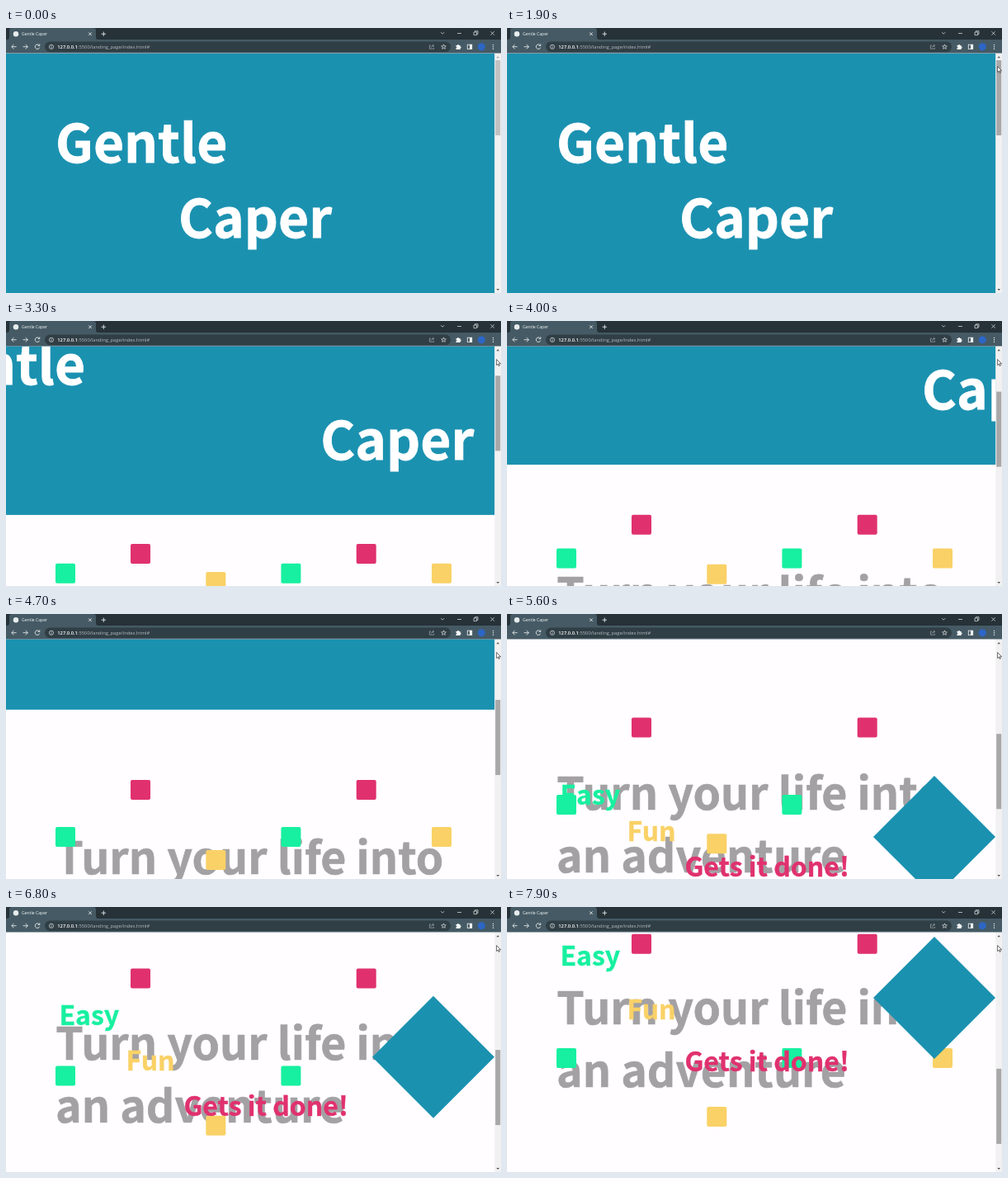
These frames come from a looping animation (600 px wide and 321 px high, 8 s). An HTML page:

```html
<!DOCTYPE html>
<html lang="en">
<head>
<meta charset="utf-8">
<title>Gentle Caper</title>
<style>
  html, body { margin: 0; width: 100%; height: 100%; overflow: hidden; background: #fffdff; }
  svg { display: block; width: 600px; height: 321px; }
  .big { font-family: "Noto Sans CJK JP", "Noto Sans CJK SC", "Noto Sans CJK", "Noto Sans", sans-serif; font-weight: 700; }
  .big text { fill: currentColor; stroke: currentColor; stroke-width: .0125em; }
  .ui { font-family: "Open Sans", "Noto Sans", sans-serif; }
  .line { fill: none; stroke: #e4e8ea; stroke-width: .9; }
  .thin { stroke-width: .7; }
</style>
</head>
<body>
<svg viewBox="0 0 600 321" xmlns="http://www.w3.org/2000/svg">
  <defs>
    <clipPath id="view"><rect y="30.5" width="592.4" height="290.5"/></clipPath>
  </defs>

  <rect width="600" height="321" fill="#fffdff"/>
  <g clip-path="url(#view)">
    <g id="lead" class="big" font-size="53.6" color="#a3a1a3">
      <text x="60.3">Turn your life into</text>
      <text x="60" y="76">an adventure</text>
    </g>
    <g id="squares"></g>
    <g class="big" font-size="32">
      <text id="easy" x="64.4" color="#17f0a0">Easy</text>
      <text id="fun" x="145.6" color="#f9d166">Fun</text>
      <text id="done" x="215.4" color="#e0316e">Gets it done!</text>
    </g>
    <path id="badge" d="M518 -74 L592 0 L518 74 L444 0 Z" fill="#1b91b0"/>
    <rect id="hero" y="30.5" width="593" height="290.5" fill="#1b91b0"/>
    <g class="big" font-size="64" color="#fff">
      <text id="word1" y="163">Gentle</text>
      <text id="word2" y="254">Caper</text>
    </g>
  </g>

  <!-- scrollbar -->
  <rect x="592.4" y="30.5" width="7.6" height="290.5" fill="#f1f1f1"/>
  <rect id="thumb" x="593.2" width="6" height="91"/>
  <path id="up" d="M594.4 36.3 L596.2 34.2 L598 36.3 Z"/>
  <path d="M594.4 316 L596.2 318.1 L598 316 Z" fill="#505050"/>

  <!-- browser window -->
  <rect width="600" height="15" fill="#263238"/>
  <rect y="14" width="600" height="16.5" fill="#455a64"/>
  <path d="M1 14 Q4 14 4 11 V3 Q4 0 7 0 H106 Q109 0 109 3 V11 Q109 14 112 14 Z" fill="#455a64"/>
  <circle cx="12" cy="7.2" r="3.2" fill="#e8ecee"/>
  <text class="ui" x="19" y="9.3" font-size="5.1" fill="#f2f5f6">Gentle Caper</text>
  <path class="line" d="M100.2 5.4 l3.6 3.6 m0 -3.6 l-3.6 3.6 M115.6 7.2 h5.4 m-2.7 -2.7 v5.4"/>
  <path class="line thin" d="M527.2 5.2 l2 2 l2 -2 M547 6.5 h5 M567 5 h3.6 v3.6 h-3.6 Z M568.4 5 v-1.3 h3.6 v3.6 h-1.3 M587.4 4.2 l4.4 4.4 m0 -4.4 l-4.4 4.4"/>
  <path class="line" d="M12.6 22.7 h-5.8 m2.7 -2.7 l-2.7 2.7 l2.7 2.7 M20.6 22.7 h5.8 m-2.7 -2.7 l2.7 2.7 l-2.7 2.7"/>
  <path class="line" d="M40.3 21 A2.8 2.8 0 1 0 40.7 23.6 M40.8 19.4 v2.1 h-2.1"/>
  <rect x="47" y="16.5" width="492" height="12.6" rx="6.3" fill="#303e45"/>
  <circle class="line thin" cx="55" cy="22.8" r="2.6"/>
  <path class="line thin" d="M55 22.3 v2 M55 21 v.6"/>
  <path class="line thin" style="stroke: #a4afb4" d="M515 21 h-1.6 v4.2 h5.2 v-1.4 M515.2 23.6 q.4 -2.3 3.3 -2.3 m-1.4 -1.5 l1.6 1.5 l-1.6 1.5"/>
  <path id="star" class="line thin" stroke-linejoin="round"/>
  <text class="ui" x="62.3" y="25" font-size="5.8" fill="#b4bdc2"><tspan fill="#fff" font-weight="600">127.0.0.1</tspan>:5500/landing_page/index.html#</text>
  <path d="M545.4 21 h1.5 a1.1 1.1 0 0 1 2.2 0 h1.5 v1.5 a1.1 1.1 0 0 1 0 2.2 v1.4 h-5.2 v-1.5 a1 1 0 0 0 0 -2 Z" fill="#f2f5f6"/>
  <rect class="line" x="559.3" y="20.2" width="5.4" height="5.2"/>
  <rect x="562" y="20" width="2.9" height="5.6" fill="#f2f5f6"/>
  <circle cx="576.3" cy="22.8" r="4.6" fill="#2d66c4"/>
  <g fill="#f2f5f6">
    <circle cx="590.5" cy="20.4" r=".7"/><circle cx="590.5" cy="22.8" r=".7"/><circle cx="590.5" cy="25.2" r=".7"/>
  </g>

  <path id="cursor" d="M0 0 V7 L1.6 5.6 L2.7 8 L3.8 7.5 L2.8 5.2 H5 Z" fill="#fff" stroke="#111" stroke-width=".6"/>
</svg>
<script>
const LOOP = 8000;
const $ = id => document.getElementById(id);
const move = (el, x, y) => el.setAttribute("transform", `translate(${x.toFixed(2)} ${y.toFixed(2)})`);

// time in ms, page scroll in px
const scrollKeys = [
  [0, 0], [2600, 0], [3300, 86], [3500, 105], [4300, 172], [4400, 172], [4700, 205],
  [5100, 255], [5200, 258], [5600, 335], [6100, 368], [6800, 423], [7000, 453], [7900, 495], [8000, 495]
];
const cursorKeys = [[0, 0], [700, 0], [1500, 1], [8000, 1]];

function sample(keys, t) {
  const i = Math.max(1, keys.findIndex(k => k[0] >= t));
  const [t0, a] = keys[i - 1], [t1, b] = keys[i];
  return a + (b - a) * (t - t0) / (t1 - t0);
}

// x, top at scroll 205, parallax rate, colour
const squares = [
  [60, 258, .3, "#17f0a0"], [151, 201, .58, "#e0316e"], [242.3, 286, .152, "#f9d166"],
  [333.4, 258, .3, "#17f0a0"], [424.7, 201, .58, "#e0316e"], [516, 258, .3, "#f9d166"]
].map(([x, top, rate, color]) => {
  const el = document.createElementNS("http://www.w3.org/2000/svg", "rect");
  const attrs = { width: 24, height: 24, rx: 2, fill: color };
  for (const k in attrs) el.setAttribute(k, attrs[k]);
  $("squares").append(el);
  return { el, x, top, rate };
});

const star = Array.from({ length: 10 }, (_, i) => {
  const r = i % 2 ? 1.3 : 3, a = i * Math.PI / 5;
  return `${(530.5 + r * Math.sin(a)).toFixed(2)} ${(22.9 - r * Math.cos(a)).toFixed(2)}`;
});
$("star").setAttribute("d", `M${star.join("L")}Z`);

function draw(t) {
  const s = sample(scrollKeys, t);
  move($("hero"), 0, -s);
  move($("word1"), 60 - 2 * s, -s);
  move($("word2"), 209 + 2 * s, -s);
  move($("lead"), 0, 438.5 - .6 * s);
  move($("easy"), 0, 566 - s);
  move($("fun"), 0, 275 - .87 * (s - 335));
  move($("done"), 0, 318.5 - .745 * (s - 335));
  move($("badge"), 0, 605 - s);
  for (const q of squares) move(q.el, q.x, q.top - q.rate * (s - 205));

  const p = sample(cursorKeys, t), ease = p * p * (3 - 2 * p);
  const x = 606 - 11.4 * ease;
  move($("cursor"), x, 66 - 19.5 * ease);
  move($("thumb"), 0, 39 + .317 * s);
  const hover = x < 599;
  $("thumb").setAttribute("fill", hover ? "#a8a8a8" : "#c1c1c1");
  $("up").setAttribute("fill", hover ? "#505050" : "#a3a3a3");
}

const start = performance.now();
function tick() {
  draw((performance.now() - start) % LOOP);
  requestAnimationFrame(tick);
}
draw(0);
requestAnimationFrame(tick);
</script>
</body>
</html>
```
